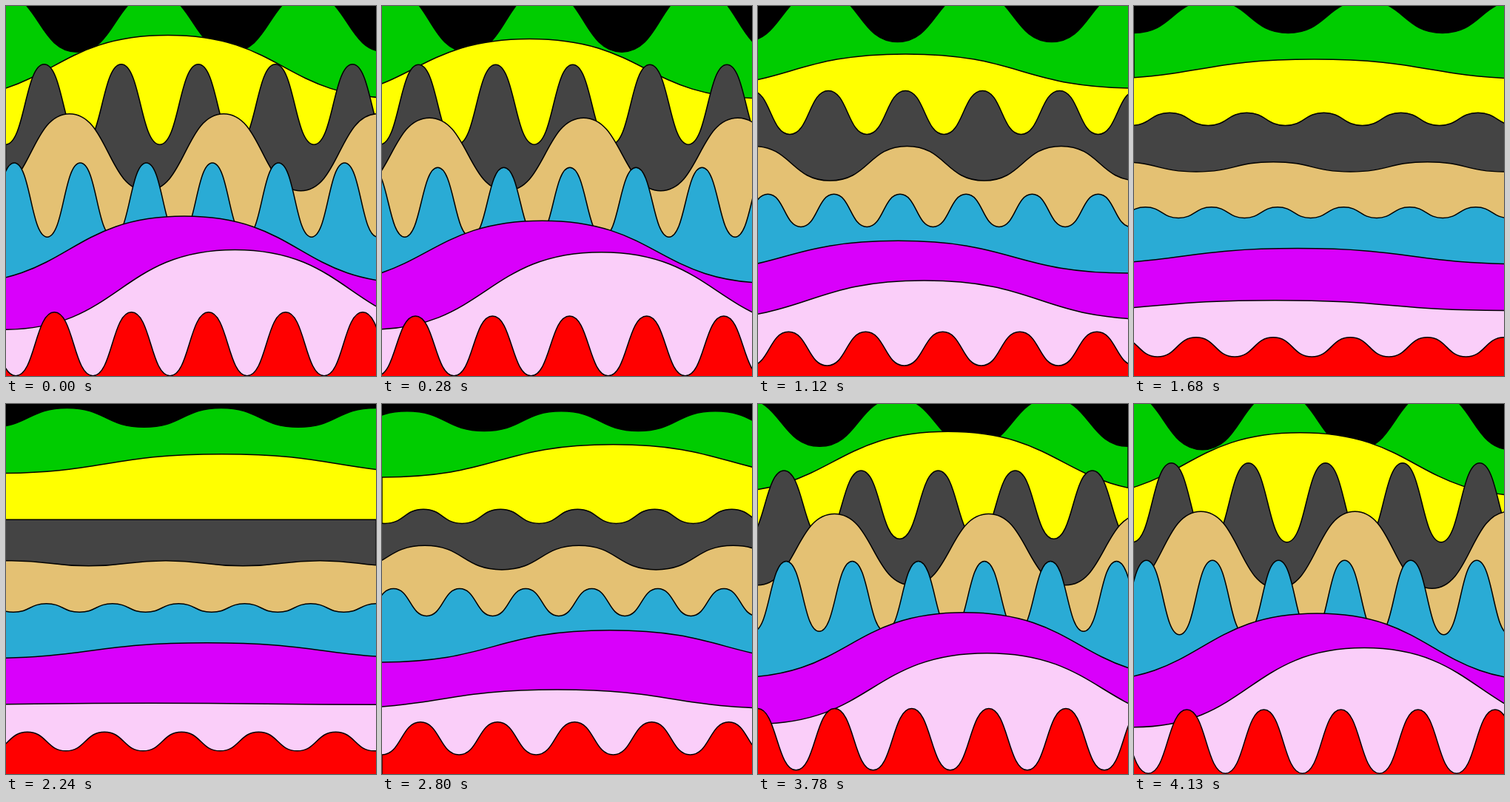
These frames come from a looping animation (500x500 px, 4.2 s). An HTML page with a canvas:

```html
<!DOCTYPE html>
<html>
<head>
<meta charset="utf-8">
<style>
html, body { margin: 0; width: 100%; height: 100%; overflow: hidden; background: #000; }
canvas { display: block; width: 100vw; height: 100vh; }
</style>
</head>
<body>
<canvas width="500" height="500"></canvas>
<script>
const SIZE = 500, STEPS = 60, STEP_MS = 70;
const WIDTH = SIZE * 1.25;
const ROW = SIZE / 8;
const SWELL_PEAK = 2;

// peakStep: the step at which a layer is furthest right
const layers = [
  { color: '#00cc00', waves: 3, peakStep: 23.8 },
  { color: '#ffff00', waves: 1, peakStep: 40 },
  { color: '#444444', waves: 6, peakStep: 1.2 },
  { color: '#e4c173', waves: 3, peakStep: 52.5 },
  { color: '#2aabd5', waves: 7, peakStep: 49.6 },
  { color: '#d900fb', waves: 1, peakStep: 43.6 },
  { color: '#facef9', waves: 1, peakStep: 57 },
  { color: '#ff0000', waves: 6, peakStep: 40.5 }
];

const ctx = document.querySelector('canvas').getContext('2d');
ctx.lineWidth = 1.5;

const cycle = (step, peak) => Math.cos((step - peak) / STEPS * 2 * Math.PI);

function drawLayer({ color, waves, peakStep }, row, step) {
  const swell = cycle(step, SWELL_PEAK);
  const sway = cycle(step, peakStep);
  const left = (WIDTH - SIZE) / 2 * (sway - 1);
  const trough = ROW * (row + 0.75 + 0.25 * swell);
  const crest = ROW * (row - 0.125 - 0.375 * swell - 0.25 * sway);
  const half = WIDTH / waves / 2;

  ctx.beginPath();
  ctx.moveTo(left, SIZE + 10);
  ctx.lineTo(left, trough);
  for (let i = 0; i < waves * 2; i++) {
    const x = left + i * half, mid = x + half / 2;
    const [from, to] = i % 2 ? [crest, trough] : [trough, crest];
    ctx.bezierCurveTo(mid, from, mid, to, x + half, to);
  }
  ctx.lineTo(left + WIDTH, SIZE + 10);
  ctx.closePath();
  ctx.fillStyle = color;
  ctx.fill();
  ctx.stroke();
}

const start = performance.now();

function draw() {
  const elapsed = performance.now() - start;
  const step = Math.floor(elapsed / STEP_MS) % STEPS;
  ctx.clearRect(0, 0, SIZE, SIZE);
  layers.forEach((layer, row) => drawLayer(layer, row, step));
  requestAnimationFrame(draw);
}
draw();
</script>
</body>
</html>
```
